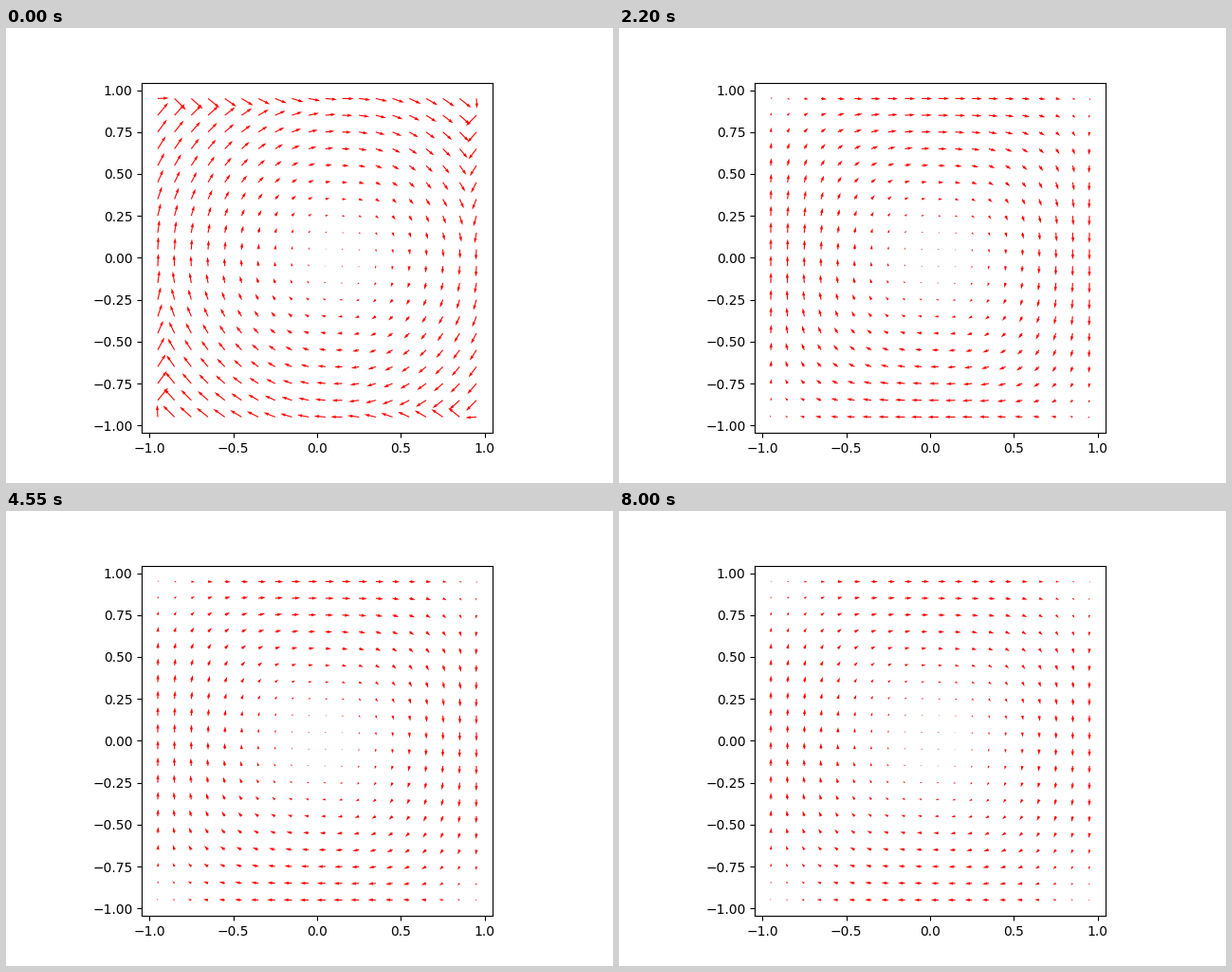
Write a matplotlib script that moves like this. It is 640x480 px and loops after 8050 ms.

```python
import numpy as np
import matplotlib.pyplot as plt
from matplotlib.animation import FuncAnimation

FRAMES = 161
INTERVAL = 50
AXES_PX = 369.6  # arrow components are in pixels

axis = np.linspace(-0.95, 0.95, 20)
X, Y = np.meshgrid(axis, axis)


def swirl(a, b, r):
    """Velocity along the walls of a square cell, with its third harmonics."""
    a, b = a * np.pi / 2, b * np.pi / 2
    base = np.sin(a) * np.cos(b)
    extra = 3 * np.sin(3 * a) * np.cos(b) + np.sin(a) * np.cos(3 * b)
    return (base - r * extra) / (1 + 2 * r)


def bounce(u, v):
    """Walls push the flow inwards; corners average their neighbours."""
    u[:, 0] = np.abs(u[:, 0])
    u[:, -1] = -np.abs(u[:, -1])
    v[0] = np.abs(v[0])
    v[-1] = -np.abs(v[-1])
    for f in (u, v):
        for i, ni in ((0, 1), (-1, -2)):
            for j, nj in ((0, 1), (-1, -2)):
                f[i, j] = (f[ni, j] + f[i, nj]) / 2


def flow(t):
    # confined vortex, slowly losing speed and drifting to the middle
    speed = 37.5 * (t + 10) ** -0.3
    r = 0.028 + 0.022 * np.exp(-t / 40)
    c = 0.03 + 0.07 * np.exp(-t / 20)
    xs = X - c * (1 - X**2)
    u = speed * swirl(Y, xs, r)
    v = -speed * swirl(xs, Y, r)

    # rigid rotation that fades out early
    w = np.exp(-t / 5)
    shift = 0.075 + 0.06 * (1 - X**2)
    u = (1 - w) * u + w * 12.8 * Y
    v = (1 - w) * v - w * 12.8 * (X - shift)
    bounce(u, v)
    return u, v


fig, ax = plt.subplots(figsize=(6.4, 4.8), dpi=100)
ax.set_aspect("equal")
arrows = ax.quiver(X, Y, *flow(0), color="red", scale=AXES_PX,
                   scale_units="width", units="width", width=0.003)
ax.set_xlim(-1.045, 1.045)
ax.set_ylim(-1.045, 1.045)


def update(i):
    arrows.set_UVC(*flow(i))
    return (arrows,)


anim = FuncAnimation(fig, update, frames=FRAMES, interval=INTERVAL,
                     repeat=True, repeat_delay=0, blit=False)
plt.show()
```
